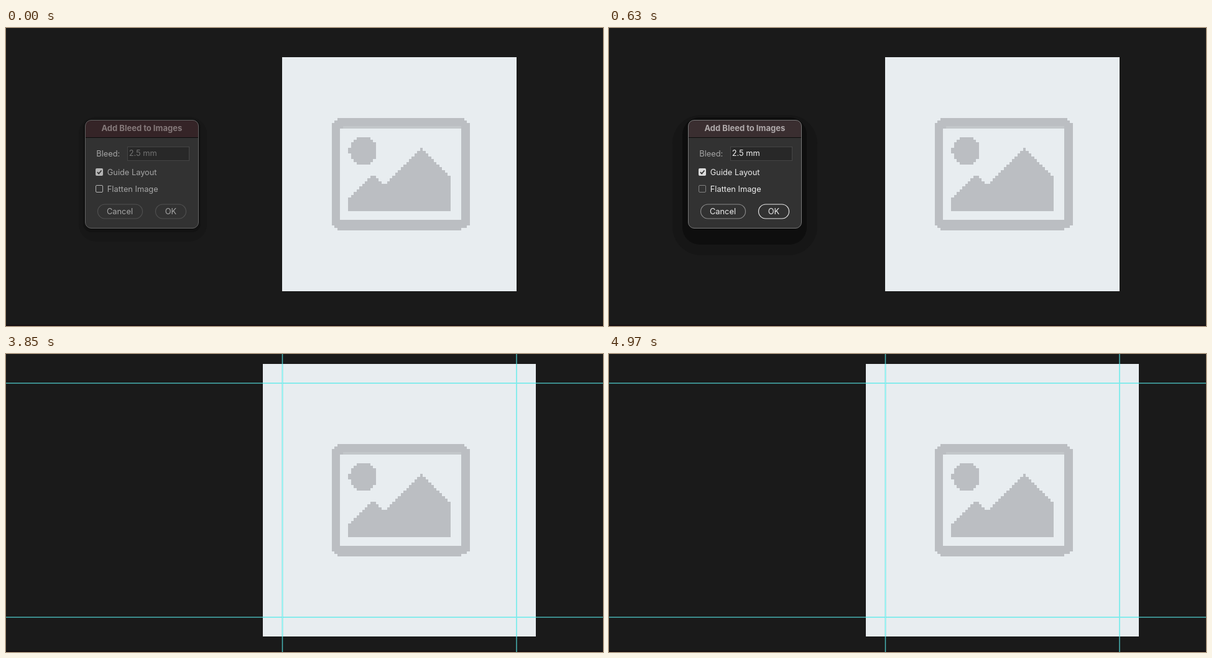
These frames come from a looping animation (960 px wide and 480 px high, 5810 ms). An HTML page:

```html
<!DOCTYPE html>
<html lang="en">
<head>
<meta charset="utf-8">
<style>
  html, body { margin: 0; width: 100%; height: 100%; overflow: hidden; background: #1a1a1a; }
  svg { display: block; width: 960px; height: 480px; }
  text { font: 400 12.8px Inter, "Open Sans", sans-serif; }
  .title { font-size: 13px; font-weight: 700; }
  .mid { text-anchor: middle; }
</style>
</head>
<body>
<svg id="stage" viewBox="0 0 960 480"></svg>
<script>
const LOOP = 5810;
const ACTIVE = 630, FLATTEN = 1540, PRESS = 3780, RESULT = 3850;

const PAPER = "#e8edf0", INK = "#bbbec2";
const CELL = 377 / 85, ORIGIN = { x: 444, y: 47 };

const themes = {
  idle: {
    title: "#352427", titleText: "#85797a", border: "#636363",
    label: "#a6a6a6", text: "#a6a6a6", value: "#727272",
    check: "#b4b4b4", box: "#b4b4b4", button: "#505050", ok: "#505050"
  },
  active: {
    title: "#3a2e30", titleText: "#b1abac", border: "#777777",
    label: "#a6a6a6", text: "#ececec", value: "#f0f0f0",
    check: "#dcdcdc", box: "#818181", button: "#8a8a8a", ok: "#e6e6e6"
  }
};

const rect = (x, y, w, h, fill, extra = "") =>
  `<rect x="${x}" y="${y}" width="${w}" height="${h}" fill="${fill}" ${extra}/>`;

const label = (x, y, content, fill, cls = "") =>
  `<text x="${x}" y="${y}" fill="${fill}" class="${cls}">${content}</text>`;

// Pixel block spanning grid columns c0..c1 and rows r0..r1
function block(c0, r0, c1, r1, fill = INK) {
  const x = c => Math.round(ORIGIN.x + c * CELL);
  const y = r => Math.round(ORIGIN.y + r * CELL);
  return rect(x(c0), y(r0), x(c1) - x(c0), y(r1) - y(r0), fill);
}

function pixelPicture() {
  let out = block(20, 22, 66, 23) + block(19, 23, 67, 24) + block(18, 24, 68, 61)
    + block(19, 61, 67, 62) + rect(533, 322, 199, 4, INK)
    + block(22, 25, 65, 26, "#c3c7ca") + block(21, 26, 65, 59, PAPER);

  const left = [27, 26, 25, 25, 24], right = [32, 33, 34, 34, 34];
  for (let r = 29; r < 39; r++) {
    const d = Math.min(r - 29, 38 - r);
    out += block(left[d], r, right[d], r + 1);
  }
  for (let c = 24; c < 61; c++) {
    const big = 33 + Math.abs(c - 50);
    const small = 43 + Math.max(32 - c, c - 33, 0);
    out += block(c, Math.min(big, small), c + 1, 56);
  }
  return out;
}

function checkbox(y, checked, theme) {
  if (!checked) {
    return rect(144.5, y + .5, 11, 11, "none", `rx="1.5" stroke="${theme.box}"`);
  }
  return rect(144, y, 12, 12, theme.check, 'rx="2"')
    + `<path d="M146.8 ${y + 6.1}l2.4 2.5 4.2-5.1" fill="none" stroke="#303030" stroke-width="1.7"/>`;
}

const pill = (x, w, stroke, fill = "none") =>
  rect(x + .5, 284, w - 1, 23, fill, `rx="11.5" stroke="${stroke}" stroke-width="1.15"`);

function shadow(active) {
  return active
    ? rect(102, 140, 233, 226, "#161616", 'rx="46"') + rect(118, 144, 200, 205, "#0e0e0e", 'rx="28"')
    : rect(117, 143, 206, 201, "#171717", 'rx="28"') + rect(124, 147, 189, 182, "#121212", 'rx="14"');
}

function dialog({ active, flatten, pressed }) {
  const t = active ? themes.active : themes.idle;
  return shadow(active)
    + rect(126.5, 147.5, 184, 176, "#0a0a0a", 'rx="10.5"')
    + rect(127.5, 148.5, 182, 174, "#323232", 'rx="9.5"')
    + `<path d="M127.5 176V158q0-9.5 9.5-9.5h163q9.5 0 9.5 9.5v18z" fill="${t.title}"/>`
    + rect(128, 176, 181, 1, "#0c0c0c")
    + rect(127.5, 148.5, 182, 174, "none", `rx="9.5" stroke="${t.border}"`)
    + label(218.3, 166, "Add Bleed to Images", t.titleText, "title mid")
    + label(145.3, 206.7, "Bleed:", t.label)
    + rect(195.5, 191.5, 99, 22, "#282828", 'stroke="#454545"')
    + label(197.8, 206.2, "2.5 mm", t.value)
    + checkbox(226, true, t) + label(162.8, 237, "Guide Layout", t.text)
    + checkbox(253, flatten, t) + label(162.8, 264, "Flatten Image", t.text)
    + pill(147, 73, t.button) + label(183, 300.2, "Cancel", t.text, "mid")
    + pill(240, 50, t.ok, pressed ? "#e2e2e2" : "none")
    + label(265, 300.2, "OK", pressed ? "#2c2c2c" : t.text, "mid");
}

function guides() {
  const onDark = "#48b4b4", onPaper = "#8ffafa";
  const across = y => rect(0, y - .75, 960, 1.5, onDark) + rect(413, y - .75, 439, 1.5, onPaper);
  const down = x => rect(x - .75, 0, 1.5, 480, onDark) + rect(x - .75, 16, 1.5, 439, onPaper);
  return across(47) + across(424) + down(444.5) + down(821);
}

const picture = pixelPicture();

function scene(time) {
  const done = time >= RESULT;
  const paper = done ? rect(413, 16, 439, 439, PAPER) : rect(444, 47, 377, 377, PAPER);
  const state = { active: time >= ACTIVE, flatten: time >= FLATTEN, pressed: time >= PRESS };
  return rect(0, 0, 960, 480, "#1a1a1a")
    + rect(0, 478, 960, 2, "#160f12")
    + (done ? "" : dialog(state))
    + paper + picture
    + (done ? guides() : "");
}

const stage = document.getElementById("stage");
const start = performance.now();
let shown = "";

function update(now) {
  const markup = scene(Math.max(0, now - start) % LOOP);
  if (markup !== shown) stage.innerHTML = shown = markup;
  requestAnimationFrame(update);
}
update(start);
</script>
</body>
</html>
```
